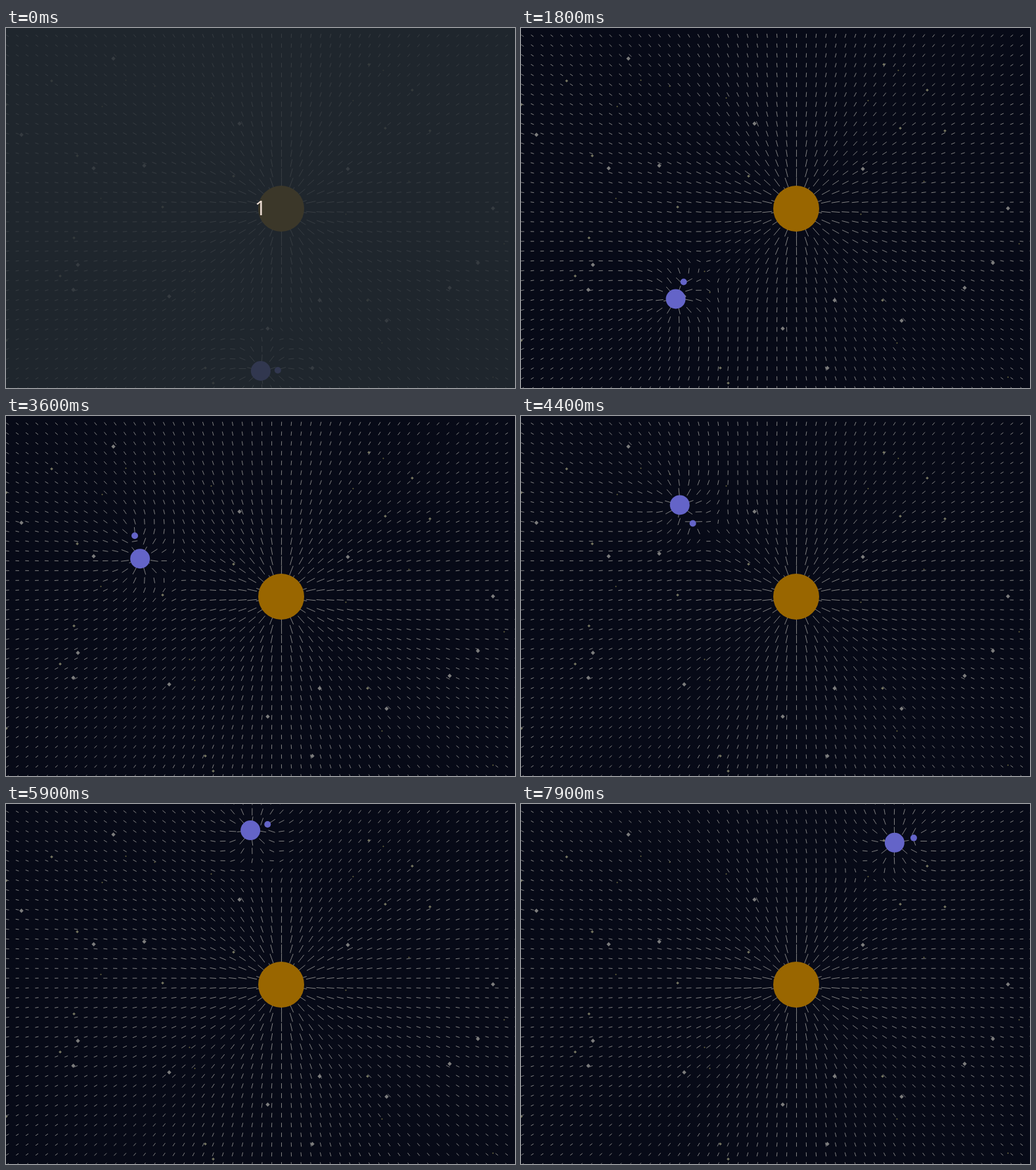
An HTML page with a canvas that plays this animation: 775 by 548 pixels, repeating every 8000 ms.

```html
<!DOCTYPE html>
<html lang="en">
<head>
<meta charset="utf-8">
<title>Gravity field</title>
<style>
  html, body { margin: 0; width: 100%; height: 100%; overflow: hidden; background: #070a17; }
  canvas { display: block; }
  #veil { position: absolute; left: 0; top: 0; width: 775px; height: 548px; background: #262d33; }
  #count {
    position: absolute; left: 0; top: 252px; width: 775px; text-align: center;
    font: 31px/42px "Open Sans", "Noto Sans", sans-serif; color: #f2e2d8;
  }
</style>
</head>
<body>
<canvas id="stage" width="775" height="548"></canvas>
<div id="veil"></div>
<div id="count">1</div>
<script>
const W = 775, H = 548, LOOP = 8000, STEP = 100, FADE = 400, GRID = 14.9;
const RAD = Math.PI / 180;
const ctx = document.getElementById('stage').getContext('2d');
const veil = document.getElementById('veil');
const count = document.getElementById('count');

const sun = { x: 419, y: 275, r: 35, mass: 1, color: '#996600' };

// Planet ellipse: semi-major axis, eccentricity, direction of perihelion,
// mean anomaly at the start and its rate per second
const ellipse = { a: 252.3, e: 0.119, turn: 187.6 * RAD, phase: -76.8 * RAD, rate: 22.95 * RAD };

// Moon relative to the planet: time in s, angle in degrees, distance
const moonKeys = [
  [0, -2, 26], [0.6, 115, 31], [1.8, 295, 28.6], [3.6, 617, 36],
  [5.2, 933, 31], [6.7, 1204, 25], [7.9, 1426, 30]
];

const brightStars = [
  [163, 46], [355, 145], [23, 162], [133, 213], [210, 209], [520, 214], [741, 274], [109, 360],
  [718, 357], [102, 398], [675, 395], [248, 408], [477, 414], [579, 445], [398, 457], [466, 517]
];

function seeded(seed) {
  return () => (seed = seed * 16807 % 2147483647) / 2147483647;
}

function makeStars() {
  const random = seeded(37);
  const stars = brightStars.map(([x, y]) => ({ x, y, r: 3.2, color: '#7c7c7c' }));
  for (let i = 0; i < 29; i++) {
    const faint = i % 2;
    stars.push({
      x: Math.floor(random() * W), y: Math.floor(random() * H),
      r: faint ? 1.3 : 2.3, color: faint ? '#66633f' : '#757560'
    });
  }
  return stars;
}
const stars = makeStars();

function planetAt(s) {
  const { a, e, turn, phase, rate } = ellipse;
  const mean = phase + rate * s;
  let E = mean;
  for (let i = 0; i < 6; i++) E = mean + e * Math.sin(E);
  const u = a * (Math.cos(E) - e), v = a * Math.sqrt(1 - e * e) * Math.sin(E);
  return {
    x: sun.x + u * Math.cos(turn) - v * Math.sin(turn),
    y: sun.y + u * Math.sin(turn) + v * Math.cos(turn)
  };
}

// Smooth cubic through one column of the keys
function curve(keys, col, s) {
  const last = keys.length - 1;
  const slope = (i, j) => (keys[j][col] - keys[i][col]) / (keys[j][0] - keys[i][0]);
  const tangent = i => slope(Math.max(i - 1, 0), Math.min(i + 1, last));
  let i = 0;
  while (i < last - 1 && s > keys[i + 1][0]) i++;
  const h = keys[i + 1][0] - keys[i][0], u = (s - keys[i][0]) / h, w = 1 - u;
  return keys[i][col] * (1 + 2 * u) * w * w + tangent(i) * h * u * w * w
    + keys[i + 1][col] * u * u * (3 - 2 * u) - tangent(i + 1) * h * u * u * w;
}

function moonAt(s, planet) {
  const angle = curve(moonKeys, 1, s) * RAD, d = curve(moonKeys, 2, s);
  return { x: planet.x + d * Math.cos(angle), y: planet.y + d * Math.sin(angle) };
}

function drawStar({ x, y, r, color }) {
  ctx.fillStyle = color;
  ctx.beginPath();
  for (let i = 0; i < 4; i++) {
    const a = i * Math.PI / 2;
    ctx.lineTo(x + 0.5 + r * Math.cos(a), y + 0.5 + r * Math.sin(a));
  }
  ctx.fill();
}

// Dashes along the pull of all bodies, longer where it is stronger
function drawField(bodies) {
  ctx.strokeStyle = '#828282';
  ctx.lineWidth = 1;
  ctx.beginPath();
  for (let y = 11.85 - GRID; y < H + 5; y += GRID) {
    for (let x = 2.3; x < W + 5; x += GRID) {
      let gx = 0, gy = 0;
      for (const b of bodies) {
        const dx = b.x - x, dy = b.y - y, d = Math.max(Math.hypot(dx, dy), 3);
        gx += b.mass * dx / d ** 3;
        gy += b.mass * dy / d ** 3;
      }
      const g = Math.hypot(gx, gy) || 1e-9;
      const half = Math.min(50 * g ** 0.25, 9) / g;
      ctx.moveTo(x - gx * half, y - gy * half);
      ctx.lineTo(x + gx * half, y + gy * half);
    }
  }
  ctx.stroke();
}

function drawBody({ x, y, r, color }) {
  ctx.fillStyle = color;
  ctx.beginPath();
  ctx.arc(x, y, r, 0, 2 * Math.PI);
  ctx.fill();
}

function render(t) {
  const s = t / 1000;
  const planet = { ...planetAt(s), r: 15, mass: 0.1, color: '#6464c8' };
  const moon = { ...moonAt(s, planet), r: 5, mass: 0.01, color: '#6464c8' };
  const bodies = [sun, planet, moon];
  ctx.fillStyle = '#070a17';
  ctx.fillRect(0, 0, W, H);
  stars.forEach(drawStar);
  drawField(bodies);
  bodies.forEach(drawBody);
  const fade = Math.max(0, 1 - t / FADE);
  veil.style.opacity = 0.81 * fade;
  count.style.opacity = fade;
}

const start = performance.now();
function tick() {
  const t = (performance.now() - start) % LOOP;
  render(Math.floor(t / STEP) * STEP);
  requestAnimationFrame(tick);
}
tick();
</script>
</body>
</html>
```
